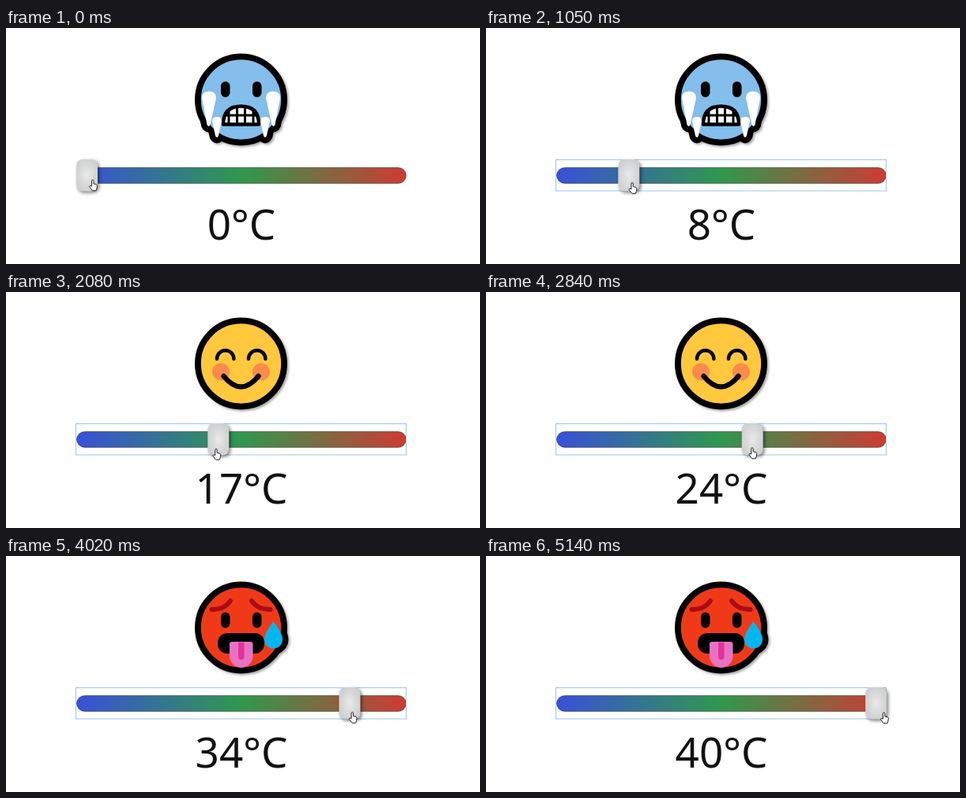
These frames come from a looping animation (600 by 300 pixels, 5.79 s). An HTML page:

```html
<!DOCTYPE html>
<html lang="en">
<head>
<meta charset="utf-8">
<title>Temperature slider</title>
<style>
  html, body { margin: 0; width: 100%; height: 100%; overflow: hidden; background: #fff; }
  svg { display: block; width: 100vw; height: 100vh; }
  #faces { filter: drop-shadow(2px 2px 1.5px rgba(0, 0, 0, .35)); }
  #thumb { filter: drop-shadow(2px 2px 2px rgba(0, 0, 0, .5)); }
  #label { font: 53px "Noto Sans", "Open Sans", sans-serif; text-anchor: middle; fill: #111; }
  .line { fill: none; stroke: #000; stroke-linecap: round; stroke-linejoin: round; }
  .bulge { stroke: #000; stroke-width: 15; stroke-linejoin: round; }
</style>
</head>
<body>
<svg viewBox="0 0 600 300">
  <defs>
    <linearGradient id="heat">
      <stop offset="0" stop-color="#3a50d8"/>
      <stop offset=".5" stop-color="#2f984d"/>
      <stop offset=".98" stop-color="#c83e35"/>
    </linearGradient>
    <radialGradient id="knob">
      <stop offset="0" stop-color="#e9e9e9"/>
      <stop offset="1" stop-color="#d0d1d2"/>
    </radialGradient>
    <clipPath id="dome"><path id="domeShape" d="M275 122.5Q275 99.5 297.5 99.5T320 122.5Z"/></clipPath>
    <g id="ice">
      <path d="M248 89Q248 80.500 257 80.500T266 89L258.500 123Q256.500 127 254.500 123Z"/>
      <path d="M261 118Q261 113 267 113T273 118L269 137Q267 141 265 137Z"/>
    </g>
    <path id="drop" d="M338.500 83Q327 98 327 106A11.500 11.500 0 0 0 350 106Q350 98 338.500 83Z"/>
    <path id="smallDrop" d="M262 43Q253 55 253 62A9 9 0 0 0 271 62Q271 55 262 43Z"/>
    <g id="eyes">
      <rect x="272" y="68" width="11.500" height="20" rx="5.750"/>
      <rect x="312" y="68" width="11.500" height="20" rx="5.750"/>
    </g>
    <g id="closedEyes" class="line" stroke-width="4.500">
      <path d="M267 85a10.700 10.700 0 0 1 21.400 0"/>
      <path d="M307 85a10.700 10.700 0 0 1 21.400 0"/>
    </g>
    <circle id="head" cx="297.5" cy="91" r="54.6" stroke="#000" stroke-width="7.8"/>
  </defs>

  <g id="faces">
    <g data-from="0">
      <g class="bulge"><use href="#ice"/><use href="#ice" transform="matrix(-1 0 0 1 595 0)"/></g>
      <use href="#head" fill="#83beec"/>
      <use href="#eyes"/>
      <use href="#domeShape" fill="#fff"/>
      <path class="line" stroke-width="3" clip-path="url(#dome)" d="M270 111H325M282 95V125M292.500 95V125M302.500 95V125M313 95V125"/>
      <use href="#domeShape" class="line" stroke-width="4.5"/>
      <g fill="#fff"><use href="#ice"/><use href="#ice" transform="matrix(-1 0 0 1 595 0)"/></g>
    </g>
    <g data-from="10">
      <use href="#head" fill="#ffc83d"/>
      <use href="#eyes"/>
      <rect x="263" y="96.5" width="69" height="22.500" rx="11" fill="#fff"/>
      <path class="line" stroke-width="3" d="M264 107.700H331M271.200 99V117M281.700 98V118M292.200 98V118M302.800 98V118M313.300 98V118M323.800 99V117"/>
      <rect x="263" y="96.5" width="69" height="22.500" rx="11" class="line" stroke-width="4"/>
    </g>
    <g data-from="17">
      <use href="#head" fill="#ffc83d"/>
      <g fill="#fb8b4c"><circle cx="272" cy="101.500" r="11"/><circle cx="323" cy="101.500" r="11"/></g>
      <use href="#closedEyes"/>
      <path class="line" stroke-width="6.500" d="M275.500 107Q297.500 134 319.500 107"/>
    </g>
    <g data-from="25">
      <use href="#head" fill="#ffc83d"/>
      <use href="#closedEyes"/>
      <path d="M268 98H327A29.500 29 0 0 1 268 98Z"/>
      <path d="M273 101.500H322L319 109H276Z" fill="#fff"/>
      <use href="#smallDrop" fill="#00b7f0"/>
    </g>
    <g data-from="30">
      <use href="#drop" class="bulge"/>
      <use href="#head" fill="#f03a17"/>
      <g fill="none" stroke="#a90d19" stroke-width="6" stroke-linecap="round">
        <path d="M260.500 68Q277 68 284 57"/><path d="M334.500 68Q318 68 311 57"/>
      </g>
      <use href="#eyes" y="3.500"/>
      <rect x="268" y="98" width="59" height="26" rx="12"/>
      <path d="M283 112Q283 109 286 109H309.500Q312.500 109 312.500 112V127A14.750 15 0 0 1 283 127Z" fill="#e673c2"/>
      <path d="M294 110H301.500V128a3.750 3.750 0 0 1-7.500 0Z" fill="#e3309d"/>
      <use href="#drop" fill="#00b7f0"/>
    </g>
  </g>

  <rect x="89.500" y="177.500" width="417" height="20" rx="10" fill="url(#heat)" stroke="#000" stroke-opacity=".42"/>
  <rect id="focus" x="88.500" y="167.500" width="418" height="39.500" fill="none" stroke="#9fc5ea"/>
  <rect id="thumb" y="167" width="27" height="40.500" rx="8" fill="url(#knob)"/>
  <text id="label" x="298" y="269"></text>
  <path id="cursor" fill="#fff" stroke="#222" d="M3.500 8.500V1.800q0-1.300 1.200-1.300t1.200 1.300V5.500l3.400.8q1.200.4 1.100 1.800l-.5 3.400-.9 2.700H4.300L.8 9.500q-.6-1.200.5-1.500z"/>
</svg>
<script>
  const LOOP = 5790, PRESS = 100, START = 280, STEP = 48.37;
  const TRACK_LEFT = 89, PER_DEGREE = 9.78, GRAB = 10;

  // time, pointer x, pointer y
  const path = [
    [230, 105, 192.5], [620, 134, 195], [1340, 211, 197], [2080, 262, 199],
    [2840, 332, 197.5], [4020, 435, 198], [5020, 498, 198], [5140, 499, 198.5]
  ];
  const byId = id => document.getElementById(id);
  const [thumb, label, cursor, focusBox] = ['thumb', 'label', 'cursor', 'focus'].map(byId);
  const faces = [...document.querySelectorAll('[data-from]')];

  function pointerAt(t) {
    const next = path.findIndex(p => p[0] > t);
    if (next === 0) return path[0].slice(1);
    if (next < 0) return path[path.length - 1].slice(1);
    const a = path[next - 1], b = path[next];
    const k = (t - a[0]) / (b[0] - a[0]);
    return [1, 2].map(i => a[i] + (b[i] - a[i]) * k);
  }

  // The pointer is sampled at a steady rate while it is dragging.
  function sampled(t) {
    if (t < START) return 0;
    if (t >= 5140) return t;
    return START + Math.min(98, Math.floor((t - START) / STEP + .3)) * STEP;
  }

  function draw(t) {
    const [x, y] = pointerAt(sampled(t));
    const pressed = t >= PRESS;
    const dragged = Math.round((x - TRACK_LEFT - GRAB) / PER_DEGREE);
    const degrees = pressed ? Math.max(0, Math.min(40, dragged)) : 0;
    const face = faces.filter(f => degrees >= +f.dataset.from).pop();
    for (const f of faces) f.style.display = f === face ? '' : 'none';
    focusBox.style.display = pressed ? '' : 'none';
    thumb.setAttribute('x', TRACK_LEFT + degrees * PER_DEGREE);
    label.textContent = degrees + '°C';
    cursor.setAttribute('transform', `translate(${x} ${y})`);
  }

  const begin = performance.now();
  function tick() {
    draw((performance.now() - begin) % LOOP);
    requestAnimationFrame(tick);
  }
  tick();
</script>
</body>
</html>
```
